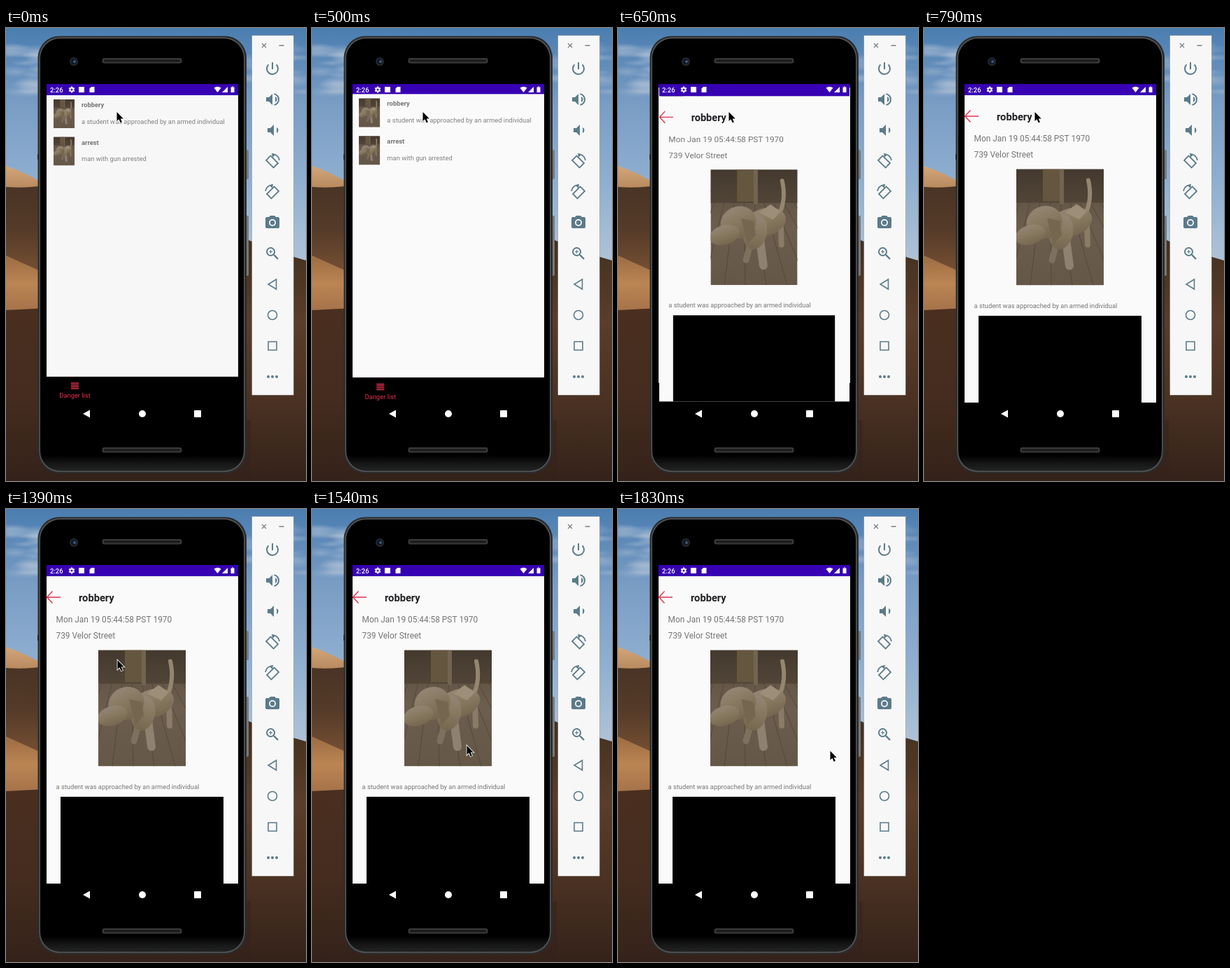
Recreate the animation shown at these times as an HTML page with a canvas. Size 429 by 647 pixels, loop 8 s.

```html
<!DOCTYPE html>
<html lang="en">
<head>
<meta charset="utf-8">
<title>Danger list</title>
<style>
html, body { margin: 0; width: 100%; height: 100%; overflow: hidden; background: #000; }
canvas { display: block; width: 429px; height: 647px; }
</style>
</head>
<body>
<canvas id="stage" width="429" height="647"></canvas>
<script>
const ctx = document.getElementById('stage').getContext('2d');
const LOOP = 8000;
const WIDTH = 429, HEIGHT = 647;
const SCREEN = { x: 58, y: 80, w: 274, h: 455, bar: 16 };
const RED = '#e5304f', GREY = '#757575', SLATE = '#5b7b8a', PURPLE = '#3700b3', PAPER = '#fafafa';
const STREET = '739 Velor Street';
const REPORT = 'a student was approached by an armed individual';

function rect(x, y, w, h, color) {
  ctx.fillStyle = color;
  ctx.fillRect(x, y, w, h);
}

function round(x, y, w, h, r, color) {
  ctx.beginPath();
  ctx.roundRect(x, y, w, h, r);
  ctx.fillStyle = color;
  ctx.fill();
}

function disc(x, y, r, color) {
  ctx.beginPath();
  ctx.arc(x, y, r, 0, 7);
  ctx.fillStyle = color;
  ctx.fill();
}

function ring(x, y, r, width, from = 0, to = 2 * Math.PI) {
  ctx.beginPath();
  ctx.arc(x, y, r, from, to);
  ctx.strokeStyle = SLATE;
  ctx.lineWidth = width;
  ctx.stroke();
}

function line(d, color, width) {
  ctx.strokeStyle = color;
  ctx.lineWidth = width;
  ctx.stroke(new Path2D(d));
}

function fill(d, color) {
  ctx.fillStyle = color;
  ctx.fill(new Path2D(d));
}

function label(str, x, y, size, color, weight = 400, align = 'left') {
  ctx.font = `${weight} ${size}px Roboto, sans-serif`;
  ctx.textAlign = align;
  ctx.fillStyle = color;
  ctx.fillText(str, x, y);
}

function fade(y0, y1, ...colors) {
  const g = ctx.createLinearGradient(0, y0, 0, y1);
  colors.forEach((c, i) => g.addColorStop(i / (colors.length - 1), c));
  return g;
}

function at(x, y, draw, sx = 1, sy = sx, turn = 0) {
  ctx.save();
  ctx.translate(x, y);
  ctx.rotate(turn);
  ctx.scale(sx, sy);
  draw();
  ctx.restore();
}

// Scales a screen about the middle of the display.
function zoom(scale, draw) {
  at(195, 316, () => {
    ctx.translate(-195, -316);
    draw();
  }, scale);
}

function randomizer(seed) {
  return () => (seed = seed * 16807 % 2147483647) / 2147483647;
}

function drawClouds() {
  const random = randomizer(77);
  const puff = ctx.createRadialGradient(0, 0, 0, 0, 0, 1);
  puff.addColorStop(0, 'rgba(196,205,220,.35)');
  puff.addColorStop(1, 'rgba(196,205,220,0)');
  for (let i = 0; i < 40; i++) {
    const x = random() < 0.5 ? random() * 60 : 340 + random() * 90;
    at(x, 22 + random() * 70, () => rect(-1, -1, 2, 2, puff), 16 + random() * 22, 4 + random() * 6);
  }
}

// A slope from the left to the right edge of a strip, filled down to the ground.
function dune(x0, y0, x1, y1, bend, color) {
  ctx.beginPath();
  ctx.moveTo(x0, y0);
  ctx.quadraticCurveTo((x0 + x1) / 2, (y0 + y1) / 2 + bend, x1, y1);
  ctx.lineTo(x1, HEIGHT);
  ctx.lineTo(x0, HEIGHT);
  ctx.fillStyle = color;
  ctx.fill();
}

function drawDesert() {
  rect(0, 0, WIDTH, HEIGHT, fade(0, 330, '#4a7db0', '#7a9dc5', '#8fafd0', '#aec2d6'));
  drawClouds();
  dune(0, 197, 60, 226, -5, fade(197, 228, '#d3a67a', '#b98a5f'));
  dune(0, 227, 60, 224, 4, fade(226, 345, '#4a3425', '#543a28', '#744e32'));
  dune(0, 325, 60, 352, 0, fade(330, 400, '#a06f45', '#bb8553', '#a8744a'));
  dune(0, 403, 60, 400, 0, fade(400, HEIGHT, '#4a2f20', '#452c1e', '#34221a'));
  dune(340, 300, WIDTH, 332, 4, fade(305, HEIGHT, '#43301f', '#5a3d2a', '#4a3122', '#34221a'));
  rect(50, 560, 300, 87, fade(560, HEIGHT, '#3c271c', '#34221a'));
}

function drawPhone() {
  round(342, 174, 5, 42, 2, '#77797a');
  round(342, 268, 5, 86, 2, '#77797a');
  round(45.5, 11.5, 298.5, 624.5, 31, '#2b2c2d');
  round(47.5, 13.5, 294, 620.5, 29, '#545657');
  round(49, 15, 291, 617.5, 28, fade(610, 634, '#000', '#161616', '#242526'));
  rect(45, 180, 2, 8, '#252627');
  for (const y of [43, 599]) {
    round(137.500, y, 114, 7.5, 3, '#3b3b3b');
    round(139.500, y + 2, 110, 3.5, 2, '#1d1d1d');
  }
  disc(97, 48, 6, '#26292d');
  disc(97, 48, 4, '#11161f');
  disc(98, 48, 2, '#395983');
}

function speaker(x) {
  fill(`M${x}-3h4l5-5V8l-5-5h-4z`, SLATE);
  ctx.beginPath();
  ctx.arc(x + 11, 0, 4.5, -1.1, 1.1);
  ctx.fillStyle = SLATE;
  ctx.fill();
}

function tablet(flip) {
  at(0, 0, () => {
    at(-0.500, 1, () => {
      ctx.strokeStyle = SLATE;
      ctx.lineWidth = 1.8;
      ctx.strokeRect(-4.500, -7.500, 9, 15);
    }, 1, 1, -Math.PI / 4);
    ring(0, 0, 10, 1.8, -1.5, -0.1);
    fill('M-1-11.500L4-9L0-5z', SLATE);
  }, flip, 1);
}

const toolIcons = [
  () => {
    ring(0, 0, 8, 2, -0.8, Math.PI + 0.8);
    rect(-1, -9, 2, 10, SLATE);
  },
  () => {
    speaker(-9);
    ring(1, 0, 8, 2, -1.4, 1.4);
  },
  () => speaker(-7),
  () => tablet(1),
  () => tablet(-1),
  () => {
    round(-10, -8, 20, 16, 2, SLATE);
    fill('M-5-8l2-2h6l2 2z', SLATE);
    disc(0, 0, 5, '#f7f7f7');
    disc(0, 0, 3.2, SLATE);
  },
  () => {
    ring(-2.500, -2.500, 5.5, 2);
    line('M2 2l6 6', SLATE, 2.4);
    line('M-5-2.500h5m-2.500-2.500v5', SLATE, 1.2);
  },
  () => line('M5.500-7V7L-6 0z', SLATE, 1.6),
  () => ring(0, 0, 6.5, 1.6),
  () => line('M-6-6H6V6H-6z', SLATE, 1.6),
  () => [-6, 0, 6].forEach(x => disc(x, 0, 2, SLATE))
];

function drawToolbar() {
  rect(351.5, 10.5, 60, 514, '#aaa7a5');
  rect(352, 11, 59, 513, '#f7f7f7');
  line('M366 22l6 6m0-6l-6 6m24.500-3h7', '#788087', 1.4);
  toolIcons.forEach((icon, i) => at(381, 58 + 44 * i, icon));
}

function drawStatus() {
  label('2:26', 63, 91.5, 9.4, '#fff', 500);
  at(94, 88, () => {
    disc(0, 0, 3.4, '#fff');
    for (let i = 0; i < 6; i++) {
      ctx.rotate(Math.PI / 3);
      rect(-1, -4.5, 2, 2, '#fff');
    }
    disc(0, 0, 1.5, PURPLE);
  });
  rect(104, 84, 8, 8, '#fff');
  fill('M122 84h4.500v8h-7v-5.500z', '#fff');
  fill('M297.500 85.500q5-3.500 10 0l-5 6.500z', '#fff');
  fill('M317 84v8h-8z', '#fff');
  rect(321.5, 84.5, 5, 7.5, '#fff');
  rect(323, 83.5, 2, 1, '#fff');
}

function drawNavigation() {
  fill('M110 551l10-5.500v11z', '#fff');
  disc(195, 551, 5, '#fff');
  round(269, 546, 10, 10, 1, '#fff');
}

// A rounded lump shaded from its top to its underside.
function lump(x, y, rx, ry, turn) {
  at(x, y, () => disc(0, 0, 1, fade(-1, 1, '#938573', '#86785f', '#75674f')), rx, ry, turn);
}

// A dog figure on a plank floor, in a 125 by 166 box.
function drawPhoto() {
  ctx.beginPath();
  ctx.rect(0, 0, 125, 166);
  ctx.clip();
  rect(0, 0, 125, 166, fade(0, 166, '#5c4e40', '#6c5e4e', '#655747'));
  for (let i = 0; i < 10; i++) line(`M${i * 12} 30L${i * 30 - 70} 166`, '#54473a', 1);
  rect(0, 0, 125, 48, fade(0, 48, '#44392e', '#514538'));
  rect(38, 0, 24, 46, '#65573f');
  rect(62, 0, 6, 50, '#736450');

  ctx.lineCap = 'round';
  line('M99 64Q109 42 103 16', '#94866f', 6);
  line('M101 74L102 108', '#897b68', 8);
  line('M60 96L51 130', '#7e705e', 9);
  line('M70 92L76 138', '#8f8170', 12);
  lump(78, 76, 31, 20, -0.3);
  lump(64, 90, 17, 25, 0.2);
  lump(40, 76, 26, 23, -0.4);
  lump(20, 94, 22, 14, -0.3);
  fill('M70 62l16-12l15 10l-11 12z', '#9c8e79');
  fill('M44 70l18 4l3 20l-12 14z', '#75674f');
}

function drawList(paper) {
  rect(58, 96, 274, 402, paper);
  rect(58, 498, 274, 37, '#000');
  const reports = [['robbery', REPORT], ['arrest', 'man with gun arrested']];
  reports.forEach(([title, text], i) => {
    const y = 102 + i * 53.5;
    at(68, y, drawPhoto, 30 / 125, 41 / 166);
    label(title, 108, y + 11, 9.33, GREY, 700);
    label(text, 108, y + 34.5, 9.33, '#808080');
  });
  for (let i = 0; i < 4; i++) rect(93, 506.5 + i * 2.6, 11, 1.5, RED);
  label('Danger list', 98.5, 528, 9.33, RED, 400, 'center');
}

function drawDetail() {
  rect(58, 80, 274, 16, PURPLE);
  rect(58, 96, 274, 439, PAPER);
  line('M78 126H59m7.500-8.500l-8 8.500l8 8.500', RED, 1.4);
  label('robbery', 104, 131.5, 14.67, '#202124', 700);
  label('Mon Jan 19 05:44:58 PST 1970', 71.5, 162, 11.9, GREY);
  label(STREET, 71.5, 185, 11.9, GREY);
  at(132, 201.5, drawPhoto);
  label(REPORT, 71.5, 400, 9.33, GREY);
  rect(78, 411, 233, 124, '#000');
}

function drawScreen(t) {
  ctx.save();
  ctx.beginPath();
  ctx.rect(SCREEN.x, SCREEN.y, SCREEN.w, SCREEN.h);
  ctx.clip();
  rect(SCREEN.x, SCREEN.y, SCREEN.w, SCREEN.bar, PURPLE);
  if (t < 500) {
    drawList('#f7f7f7');
  } else if (t < 650) {
    zoom(1.0075, () => drawList(PAPER));
  } else if (t < 790) {
    zoom(1.05, () => drawList(PAPER));
    rect(SCREEN.x, 507, SCREEN.w, 28, '#000');
    zoom(0.993, drawDetail);
  } else {
    drawDetail();
  }
  ctx.restore();
  drawStatus();
  drawNavigation();
}

const pointerStops = [
  { from: 0, x: 158.5, y: 120 },
  { from: 1390, x: 159.5, y: 216 },
  { from: 1540, x: 221.5, y: 338 },
  { from: 1680, x: 301.5, y: 348 },
  { from: 1830, x: 303.5, y: 345.5 }
];

function drawPointer(t) {
  const { x, y } = pointerStops.findLast(stop => stop.from <= t);
  at(x, y, () => {
    const arrow = 'M0 0v14.500l3.300-3l2.400 5.500l2.500-1l-2.400-5.500h4.500z';
    line(arrow, '#fff', 1.8);
    fill(arrow, '#000');
  }, 0.9);
}

function frame(now) {
  const t = now % LOOP;
  drawDesert();
  drawPhone();
  drawToolbar();
  drawScreen(t);
  drawPointer(t);
  requestAnimationFrame(frame);
}

frame(0);
</script>
</body>
</html>
```
